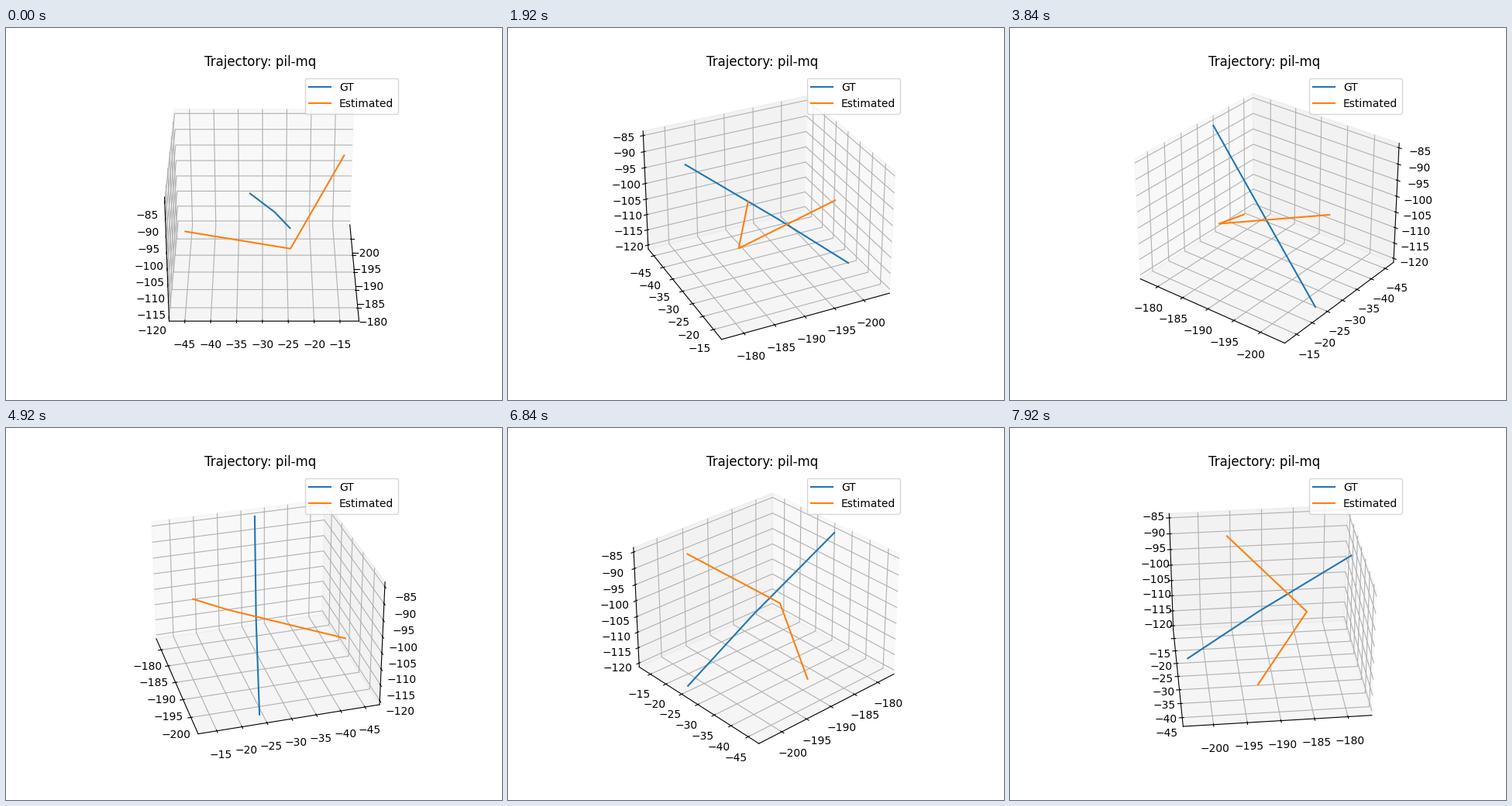
Write a matplotlib script that moves like this. It is 640x480 px and loops after 8 s.

```python
import matplotlib.pyplot as plt
from matplotlib.animation import FuncAnimation
from matplotlib.ticker import MultipleLocator

INTERVAL = 40      # ms per drawn frame
HOLD = 3           # drawn frames per camera step (120 ms)
LOOP = 8000        # ms

# x, y, z of the three key points on each path
PATHS = {
    "GT": [(-178.21, -32.29, -84.37),
           (-191.70, -27.57, -103.77),
           (-202.69, -24.16, -120.55)],
    "Estimated": [(-193.22, -45.71, -111.59),
                  (-183.97, -24.52, -107.10),
                  (-195.63, -13.65, -89.93)],
}


def padded(values, margin):
    """Data range widened by a margin, then by 1/48 on each side."""
    low, high = min(values), max(values)
    for part in (margin, 1 / 48):
        pad = (high - low) * part
        low, high = low - pad, high + pad
    return low, high


fig = plt.figure(figsize=(6.4, 4.8), dpi=100)
ax = fig.add_subplot(111, projection="3d")

for label, points in PATHS.items():
    ax.plot(*zip(*points), label=label)

xs, ys, zs = zip(*sum(PATHS.values(), []))
ax.set_xlim(*padded(xs, 0.05), view_margin=0)
ax.set_ylim(*padded(ys, 0.05), view_margin=0)
ax.set_zlim(*padded(zs, 0), view_margin=0)
for axis in (ax.xaxis, ax.yaxis, ax.zaxis):
    axis.set_major_locator(MultipleLocator(5))

ax.set_title("Trajectory: pil-mq")
ax.legend()


def update(frame):
    # 4 degrees per step, kept a hair off the exact axis-aligned views
    step = frame // HOLD
    ax.view_init(elev=30, azim=1e-4 + 3.99999 * step)
    return ()


anim = FuncAnimation(fig, update, frames=LOOP // INTERVAL, interval=INTERVAL,
                     repeat=True, repeat_delay=0, blit=False)
plt.show()
```
